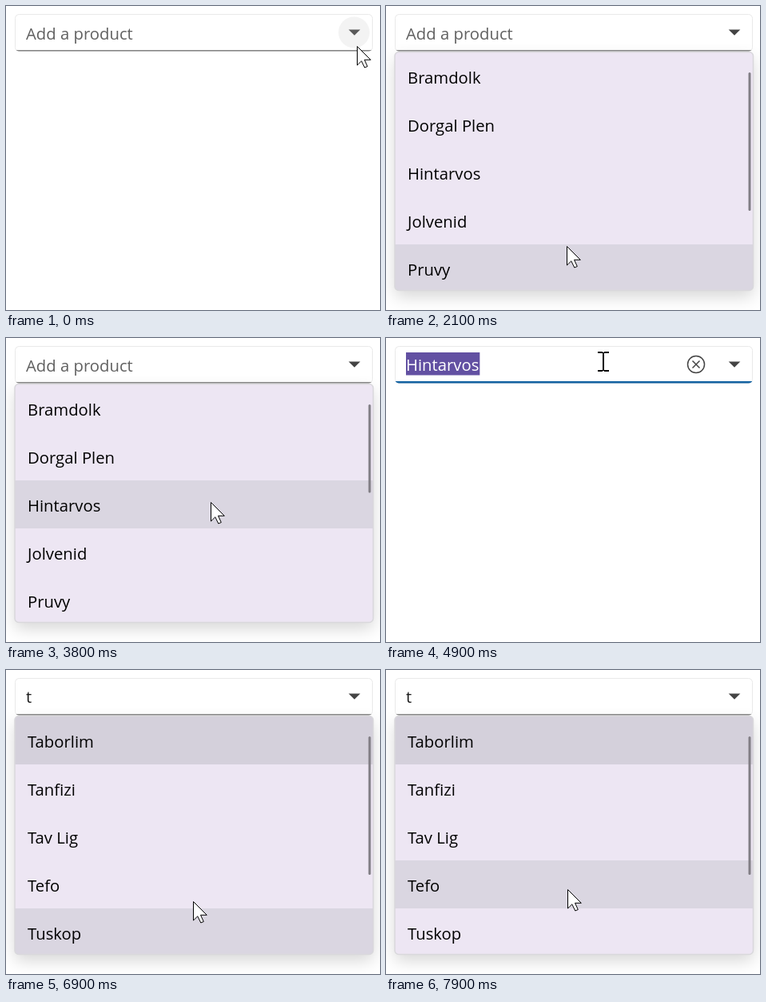
Recreate the animation shown at these times as an HTML page with a canvas. Size 468 by 380 pixels, loop 8000 ms.

```html
<!DOCTYPE html>
<html lang="en">
<head>
<meta charset="utf-8">
<title>Product picker</title>
<style>
  html, body { margin: 0; width: 100%; height: 100%; overflow: hidden; background: #fff; }
  canvas { display: block; }
</style>
</head>
<body>
<canvas id="stage" width="468" height="380"></canvas>
<script>
const ctx = document.getElementById('stage').getContext('2d');
const LOOP = 8000, STEP = 100, ROW = 60, MAX_BOTTOM = 356;
const FONT = '20.3px "Open Sans", "Noto Sans", sans-serif';
const MORE = 'LOAD MORE';
const FIRST = ['Bramdolk', 'Dorgal Plen'];
const SECOND = [...FIRST, 'Hintarvos', 'Jolvenid', 'Pruvy', 'Taborlim'];
const MATCHES = ['Taborlim', 'Tanfizi', 'Tav Lig', 'Tefo', 'Tuskop'];
const ALL = [...SECOND, ...MATCHES.slice(1)];
const HOME = { x: 439, y: 50 };

// Pointer moves: start, end, goal x, goal y; it rests in between
const MOVES = [
  [0, 200, 436, 32],      // drop-down button
  [700, 1300, 221, 203],  // load more
  [1700, 2000, 226, 300],
  [2200, 2400, 230, 225],
  [2500, 2900, 257, 340],
  [3000, 3200, 255, 323], // load more again
  [3400, 3800, 256, 205], // pick an item
  [4100, 4600, 272, 30],  // text field
  [5700, 6200, 250, 150], // browse the matches
  [6300, 6800, 235, 302],
  [6800, 6900, 234, 289],
  [6900, 7400, 229, 90],
  [7400, 7700, 226, 293],
  [7800, 7900, 227, 274]
];

const within = (t, a, b) => t >= a && t < b;

function ease(t, a, b) {
  const p = Math.min(1, Math.max(0, (t - a) / (b - a)));
  return p * p * (3 - 2 * p);
}

function pointerAt(t) {
  return MOVES.reduce((p, [a, b, x, y]) => {
    const e = ease(t, a, b);
    return { x: p.x + (x - p.x) * e, y: p.y + (y - p.y) * e };
  }, HOME);
}

// Wheel down to the end of the seven-row list, then back up
function scrollAt(t) {
  return (7 * ROW - 297) * (ease(t, 2500, 2900) - ease(t, 3400, 3700));
}

function popupAt(t) {
  if (within(t, 600, 1600)) return { items: [...FIRST, MORE], rows: 3, top: 59 };
  if (within(t, 1600, 3400)) return { items: [...SECOND, MORE], rows: 7, top: 58 };
  if (within(t, 3400, 4200)) return { items: [...ALL, MORE], rows: 11, top: 58 };
  if (t >= 5500) return { items: MATCHES, rows: 7, top: 58, selected: 0 };
  return null;
}

function box(x, y, w, h, r) {
  ctx.beginPath();
  ctx.roundRect(x, y, w, h, r);
}

function fillRect(color, x, y, w, h) {
  ctx.fillStyle = color;
  ctx.fillRect(x, y, w, h);
}

function label(text, x, y, color) {
  ctx.fillStyle = color;
  ctx.fillText(text, x, y);
}

function disc(x, y, r, color) {
  ctx.fillStyle = color;
  ctx.beginPath();
  ctx.arc(x, y, r, 0, 7);
  ctx.fill();
}

function polygon(points) {
  ctx.beginPath();
  points.forEach(([x, y]) => ctx.lineTo(x, y));
  ctx.closePath();
}

function drawField(t, pointer) {
  const focus = within(t, 500, 1500) || within(t, 4200, 6300);
  const value = t < 4200 ? '' : t < 5400 ? 'Hintarvos' : 't';
  const selected = within(t, 4200, 5400);
  const hover = Math.hypot(pointer.x - 435.5, pointer.y - 33) < 20;

  box(11.5, 10.5, 447, 46, 5);
  ctx.strokeStyle = '#e9e9e9';
  ctx.lineWidth = 1;
  ctx.stroke();
  ctx.save();
  box(11, 10, 448, 46.5, 5);
  ctx.clip();
  if (focus) fillRect('#1463a2', 11, 54, 448, 3);
  else fillRect('#868686', 11, 55, 448, 2);
  ctx.restore();

  if (hover) disc(435.5, 33, 19.5, '#f3f3f3');
  polygon([[428.7, 29.5], [443.3, 29.5], [436, 36.8]]);
  ctx.fillStyle = hover ? '#5a5a5a' : '#444';
  ctx.fill();

  if (selected) fillRect('#6250a2', 25, 18, ctx.measureText(value).width + 1, 28.5);
  if (value) label(value, 25, 41, selected ? '#fff' : '#1a1a1a');
  else label('Add a product', 25, 42, focus ? '#8c8c8c' : '#606060');

  if (within(t, 500, 1500)) fillRect('#000', 25, 18, 2, 29);
  if (within(t, 5400, 6200)) fillRect('#000', 33, 18, 2, 29);
  if (within(t, 4200, 6200)) drawClear(388, 33);
}

function drawClear(x, y) {
  ctx.strokeStyle = '#444';
  ctx.lineWidth = 1.5;
  ctx.beginPath();
  ctx.arc(x, y, 10.5, 0, 7);
  for (const s of [-1, 1]) {
    ctx.moveTo(x - 4.5, y - 4.5 * s);
    ctx.lineTo(x + 4.5, y + 4.5 * s);
  }
  ctx.stroke();
}

function drawPopup({ items, rows, top, selected }, scroll, hoverY) {
  const bottom = Math.min(top + rows * ROW - 2, MAX_BOTTOM);
  const shape = () => box(11, 57.5, 448.5, bottom - 58, 5);

  ctx.save();
  ctx.shadowColor = 'rgba(0,0,0,.16)';
  ctx.shadowBlur = 20;
  ctx.shadowOffsetY = 8;
  ctx.fillStyle = '#ede6f3';
  shape();
  ctx.fill();
  ctx.restore();

  ctx.save();
  shape();
  ctx.clip();
  items.forEach((name, i) => {
    const y = top + i * ROW - scroll;
    const hover = name !== MORE && within(hoverY, y, y + ROW);
    if (i === selected) fillRect('#d4d0db', 11, y, 448, ROW);
    else if (hover) fillRect('#dad6e1', 11, y, 448, ROW);
    label(name, name === MORE ? 178.5 : 27, y + 39, '#000');
  });
  ctx.restore();

  ctx.strokeStyle = '#d9d8dc';
  ctx.lineWidth = 1.5;
  shape();
  ctx.stroke();
  drawThumb(top, bottom - top - 1, rows * ROW, scroll);
}

function drawThumb(top, view, content, scroll) {
  const track = view - 49;
  const size = track * Math.min(1, view / (content + 6));
  const range = Math.max(1, content - view);
  box(453.5, top + 25 + (track - size) * scroll / range, 3, size, 1.5);
  ctx.fillStyle = '#817e85';
  ctx.fill();
}

function drawArrow(x, y) {
  ctx.save();
  ctx.translate(Math.round(x) + .5, Math.round(y) + .5);
  polygon([[0, 0], [0, 23.5], [5.3, 18.3], [9.3, 26.5], [12.8, 25], [9, 16.8], [16.8, 16.8]]);
  ctx.fillStyle = '#fff';
  ctx.fill();
  ctx.strokeStyle = '#000';
  ctx.lineWidth = 1;
  ctx.stroke();
  ctx.restore();
}

function drawBeam(x, y) {
  x = Math.round(x);
  y = Math.round(y);
  fillRect('#000', x - 1, y - 12, 2, 23);
  for (const edge of [-13, 10]) {
    fillRect('#000', x - 7, y + edge, 6, 2);
    fillRect('#000', x + 1, y + edge, 6, 2);
  }
}

function draw(t) {
  const pointer = pointerAt(t);
  const popup = popupAt(t);
  fillRect('#fff', 0, 0, 468, 380);
  ctx.font = FONT;
  // Row highlight trails the pointer by one step
  if (popup) drawPopup(popup, scrollAt(t), pointerAt(t - STEP).y);
  drawField(t, pointer);
  const inText = pointer.y < 56 && pointer.x < 415;
  (inText ? drawBeam : drawArrow)(pointer.x, pointer.y);
}

const start = performance.now();
function tick() {
  const t = (performance.now() - start) % LOOP;
  draw(Math.floor(t / STEP) * STEP);
  requestAnimationFrame(tick);
}
tick();
</script>
</body>
</html>
```
